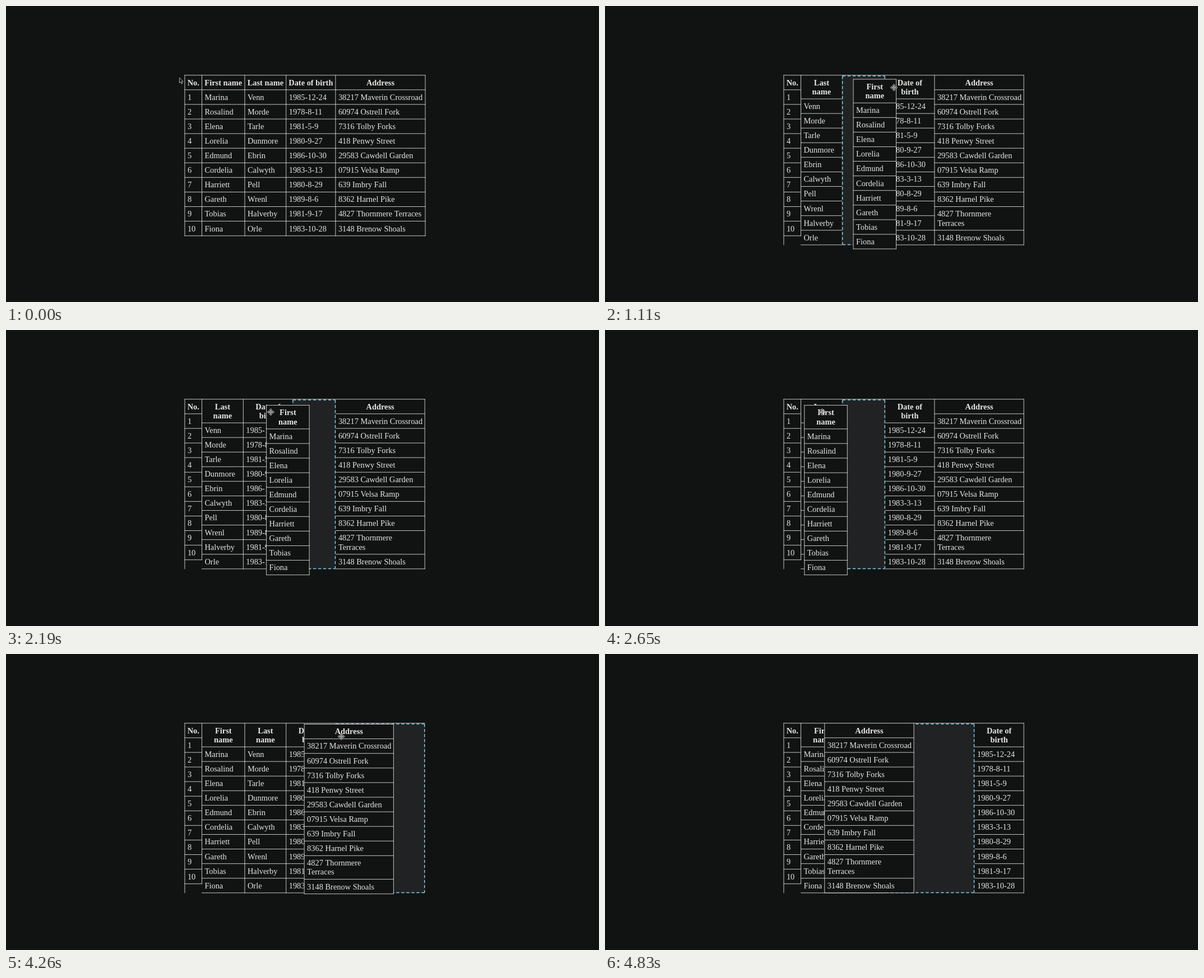
An HTML page with a canvas that plays this animation: 1058x529 px, repeating every 4910 ms.

```html
<!DOCTYPE html>
<html lang="en">
<head>
<meta charset="utf-8">
<title>Draggable table columns</title>
<style>
  html, body { margin: 0; width: 100%; height: 100%; overflow: hidden; background: #111313; }
  canvas { display: block; }
</style>
</head>
<body>
<canvas id="stage" width="1058" height="529"></canvas>
<script>
const ctx = document.getElementById('stage').getContext('2d');
const LOOP = 4910;
const W = 1176, H = 588, SCALE = 1058 / W;
const BG = '#111313', INK = '#e8e6e3', LINE = '#d8d6d2', SLOT = '#202223', DASH = '#87ceeb';
const LEFT = 354, TOP = 137, ROW = 29, LEAD = 18, BASE = 20.4;
const DRAG_HEIGHT = ROW * 11 + LEAD;

// '|' marks where a text wraps while columns are being dragged
const columns = {
  no: { w: 34, head: 'No.', cells: '1,2,3,4,5,6,7,8,9,10' },
  first: {
    w: 85, head: 'First|name',
    cells: 'Marina,Rosalind,Elena,Lorelia,Edmund,Cordelia,Harriett,Gareth,Tobias,Fiona'
  },
  last: {
    w: 82, head: 'Last|name',
    cells: 'Venn,Morde,Tarle,Dunmore,Ebrin,Calwyth,Pell,Wrenl,Halverby,Orle'
  },
  date: {
    w: 98, head: 'Date of|birth',
    cells: '1985-12-24,1978-8-11,1981-5-9,1980-9-27,1986-10-30,1983-3-13,1980-8-29,1989-8-6,1981-9-17,1983-10-28'
  },
  address: {
    w: 178, dragW: 177, head: 'Address',
    cells: '38217 Maverin Crossroad,60974 Ostrell Fork,7316 Tolby Forks,418 Penwy Street,' +
      '29583 Cawdell Garden,07915 Velsa Ramp,639 Imbry Fall,8362 Harnel Pike,' +
      '4827 Thornmere|Terraces,3148 Brenow Shoals'
  }
};

const easeIn = u => u ** (4 / 3);
const easeOut = u => 1 - easeIn(1 - u);
const lerp = (a, b, u) => a + (b - a) * u;

// hops: when the dragged column changes places with a neighbour
const drags = [
  {
    name: 'first', start: 620, end: 3240, slot: 1, grab: [47, 14],
    hops: [[1100, 1], [1330, 1], [2340, -1], [2820, -1]],
    moves: [
      { span: [620, 1110], from: [388, 137], to: [492, 145], ease: easeIn },
      { span: [1180, 1640], from: [526, 148], to: [648, 149], ease: easeOut },
      { span: [1820, 2280], from: [653, 149], to: [478, 149], ease: easeIn },
      { span: [2350, 2830], from: [458, 149], to: [376, 149], ease: easeOut },
      { span: [3060, 3240], from: [374, 149], to: [374, 149], ease: easeIn }
    ]
  },
  {
    name: 'address', start: 4040, end: 4800, slot: 4, grab: [103, 25],
    hops: [[4350, -1]],
    moves: [
      { span: [4040, 4490], from: [653, 137], to: [497, 141], ease: easeIn },
      { span: [4570, 4830], steps: 3, from: [488, 141], to: [435, 137], ease: easeOut }
    ]
  }
];

// Progress from 0 to 1 in equal jumps; the bias absorbs uneven update times
function progress(t, [start, end], steps = 6) {
  const u = Math.floor((t - start) / (end - start) * steps + 0.3) / steps;
  return Math.min(1, Math.max(0, u));
}

function columnAt(drag, t) {
  const move = drag.moves.filter(m => m.span[0] <= t + 1).pop() || drag.moves[0];
  const u = move.ease(progress(t, move.span, move.steps));
  return move.from.map((v, i) => Math.round(lerp(v, move.to[i], u)));
}

function orderAt(drag, t) {
  const names = Object.keys(columns);
  if (!drag) return names;
  const slot = drag.hops.reduce((s, [at, by]) => t >= at ? s + by : s, drag.slot);
  const rest = names.filter(n => n !== drag.name);
  rest.splice(slot, 0, drag.name);
  return rest;
}

function hLine(x, y, w) {
  ctx.fillStyle = LINE;
  ctx.fillRect(x, y, w + 1, 1);
}

function vLine(x, y, h) {
  ctx.fillStyle = LINE;
  ctx.fillRect(x, y, 1, h + 1);
}

const widthOf = (col, dragging) => dragging && col.dragW || col.w;

function drawColumn(col, x, y, dragging) {
  const w = widthOf(col, dragging);
  let top = y;
  [col.head, ...col.cells.split(',')].forEach((text, i) => {
    const lines = dragging ? text.split('|') : [text.replace('|', ' ')];
    ctx.font = (i ? '' : 'bold ') + '16px "Liberation Serif", serif';
    ctx.textAlign = i ? 'left' : 'center';
    ctx.fillStyle = INK;
    lines.forEach((line, j) =>
      ctx.fillText(line, i ? x + 6 : x + w / 2 + 0.5, top + BASE + j * LEAD));
    top += ROW + (lines.length - 1) * LEAD;
    hLine(x, top, w);
  });
  vLine(x + w, y, top - y);
}

function drawFloating(col, x, y) {
  const w = widthOf(col, true);
  ctx.fillStyle = BG;
  ctx.fillRect(x, y, w, DRAG_HEIGHT);
  hLine(x, y, w);
  vLine(x, y, DRAG_HEIGHT);
  drawColumn(col, x, y, true);
}

function drawSlot(x, w) {
  const l = x + 1, r = x + w, t = TOP + 2, b = TOP + DRAG_HEIGHT;
  ctx.fillStyle = SLOT;
  ctx.fillRect(x, TOP + 1, w + 1, DRAG_HEIGHT);
  ctx.strokeStyle = DASH;
  ctx.lineWidth = 1.6;
  ctx.setLineDash([6, 4]);
  for (const [x1, y1, x2, y2] of [[l, t, r, t], [l, b, r, b], [l, t, l, b], [r, t, r, b]]) {
    ctx.beginPath();
    ctx.moveTo(x1, y1);
    ctx.lineTo(x2, y2);
    ctx.stroke();
  }
  ctx.setLineDash([]);
}

function drawTable(order, drag) {
  let x = LEFT, slotX;
  for (const name of order) {
    if (drag && name === drag.name) slotX = x;
    else drawColumn(columns[name], x, TOP, !!drag);
    x += widthOf(columns[name], !!drag);
  }
  hLine(LEFT, TOP, x - LEFT);
  vLine(LEFT, TOP, drag ? DRAG_HEIGHT : ROW * 11);
  if (drag) drawSlot(slotX, widthOf(columns[drag.name], true));
}

const arrowShape = new Path2D('M0.5 0.5V10.8L2.9 8.8L4.6 12.6L6.4 11.8L4.8 8.2H7.8Z');
const moveShape = new Path2D(
  'M0 -7L2.6 -4H-2.6Z M0 7L2.6 4H-2.6Z M-7 0L-4 -2.6V2.6Z M7 0L4 -2.6V2.6Z ' +
  'M-2.2 -2.2H2.2V2.2H-2.2Z M0 -4V4 M-4 0H4');

function drawPointer(shape, x, y) {
  ctx.save();
  ctx.translate(x, y);
  ctx.fillStyle = BG;
  ctx.strokeStyle = INK;
  ctx.lineWidth = 0.8;
  ctx.fill(shape);
  ctx.stroke(shape);
  ctx.restore();
}

function pointer(t) {
  if (t < 460) {
    const u = progress(t, [0, 240], 3);
    drawPointer(arrowShape, lerp(343.5, 431, u), lerp(142, 144, u) - 10 * Math.sin(Math.PI * u));
    return;
  }
  const drag = drags.find(d => t < d.end);
  if (drag && (t >= drag.start || drag === drags[0])) {
    // The pointer runs one update ahead of the column
    const [x, y] = columnAt(drag, t + 80);
    drawPointer(moveShape, x + drag.grab[0], y + drag.grab[1]);
  } else if (drag) {
    const u = progress(t, [3240, 3710]);
    drawPointer(arrowShape, lerp(428, 800, u), lerp(159, 201, u ** 4));
  }
}

function draw(t) {
  ctx.setTransform(SCALE, 0, 0, SCALE, 0, 0);
  ctx.fillStyle = BG;
  ctx.fillRect(0, 0, W, H);
  const drag = drags.filter(d => t >= d.start).pop();
  drawTable(orderAt(drag, t), drag);
  if (drag) drawFloating(columns[drag.name], ...columnAt(drag, t));
  pointer(t);
}

const began = performance.now();
function tick() {
  draw((performance.now() - began) % LOOP);
  requestAnimationFrame(tick);
}
tick();
</script>
</body>
</html>
```
